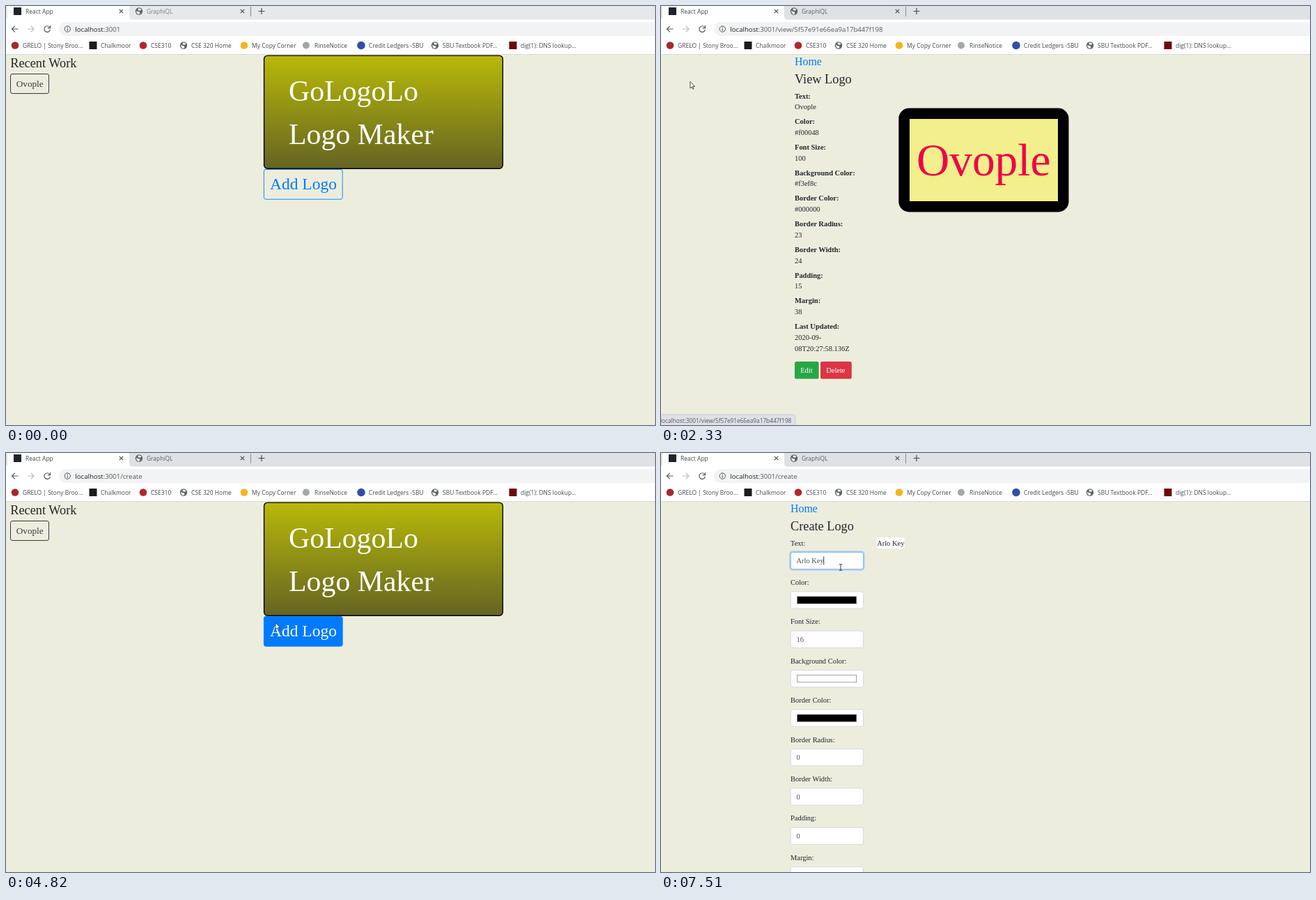
An HTML page for the animation above (8 s loop, 932x601 px).

```html
<!DOCTYPE html>
<html lang="en">
<head>
<meta charset="utf-8">
<title>Logo maker</title>
<style>
html, body { margin: 0; width: 100%; height: 100%; overflow: hidden; background: #ededde; }
svg { display: block; width: 932px; height: 601px; }
text { white-space: pre; }
.ui { font-family: "Open Sans", "Noto Sans", sans-serif; }
.page { font-family: "Liberation Serif", "Noto Serif", serif; }
</style>
</head>
<body>
<svg id="stage" viewBox="0 0 932 601"></svg>
<script>
const LOOP = 8000;
const BASE = 10.46;
const INK = '#212529';
const HASH = '/view/5f57e91e66ea9a17b447f198';
const LOGO = 'Ovople';
const NAME = 'Arlo Key';

const text = (x, y, size, str, fill = INK, extra = '') =>
  `<text x="${x}" y="${y}" font-size="${size}" fill="${fill}" ${extra}>${str}</text>`;
const rect = (x, y, w, h, fill, extra = '') =>
  `<rect x="${x}" y="${y}" width="${w}" height="${h}" fill="${fill}" ${extra}/>`;
const dot = (x, y, r, fill, extra = '') =>
  `<circle cx="${x}" cy="${y}" r="${r}" fill="${fill}" ${extra}/>`;
const line = (d, color = '#54575c', width = 1.2, extra = '') =>
  `<path d="${d}" fill="none" stroke="${color}" stroke-width="${width}" ${extra}/>`;
const group = (id, body, cls = '') => `<g id="${id}" class="${cls}">${body}</g>`;

const globe = (x, y) => dot(x, y, 5.2, '#5f6368') +
  `<path d="M${x - 4} ${y - 1}q2 2 3.5 1.5t2 2.5l-2 1.5q-3-1-3.5-5.5zM${x - 1} ${y - 4}q3-.6 4.5 2l-2.5 1.2-2.5-1z" fill="#fff"/>`;
const cross = (x, y) => line(`M${x - 2.7} ${y - 2.7}l5.4 5.4m0-5.4l-5.4 5.4`, '#45484d', 1.1);
const square = (x, y, fill) => rect(x - 5.5, y - 5.5, 11, 11, fill);

function browser() {
  const marks = [
    [24, 'GRELO | Stony Broo...', dot(13, 56.5, 5.3, '#a5282c')],
    [136, 'Chalkmoor', square(125, 56.5, '#1c1c1c')],
    [208, 'CSE310', dot(197, 56.5, 5.3, '#b3272d')],
    [266, 'CSE 320 Home', globe(255, 56.5)],
    [353, 'My Copy Corner', dot(342, 56.5, 5.3, '#f2b51d')],
    [443, 'RinseNotice', dot(431, 56.5, 5, '#a3a6aa')],
    [521, 'Credit Ledgers -SBU', dot(510, 56.5, 5.8, '#2f4fa8')],
    [627, 'SBU Textbook PDF...', globe(616, 56.5)],
    [739, 'dig(1): DNS lookup...', square(728, 56.5, '#6d0a10')]
  ];
  return rect(0, 0, 932, 20, '#dee1e6', 'id="strip"') +
    '<path d="M-3 20Q2 20 2 14V-2H177V14Q177 20 183 20Z" fill="#fff"/>' +
    rect(0, 19.5, 932, 50, '#fff') + rect(0, 69, 932, 1, '#d9dad4') +
    square(16.5, 7.5, '#20232a') + text(28, 10.7, 8.5, 'React App', '#45484d') + cross(165.5, 7.5) +
    globe(191, 7.5) + text(202, 10.7, 8.4, 'GraphiQL', '#5b5e63', 'id="tab"') + cross(339.5, 7.5) +
    line('M351.5 1V15', '#85888d', 1) + line('M362.5 7.5h9m-4.5-4.5v9', '#45484d') +
    line('M17.5 33H8.5m4.3-4.3L8.5 33l4.3 4.3') +
    line('M31 33h9m-4.3-4.3L40 33l-4.3 4.3', '#b9bbbe') +
    line('M62.6 30.4A4.3 4.3 0 1 0 63.4 34M63.5 28v3.6h-3.6') +
    rect(76, 23, 880, 20, '#f1f3f4', 'rx="10"') +
    dot(88.3, 33, 4.2, 'none', 'stroke="#54575c"') + line('M88.3 32.4v3M88.3 30.3v1.1') +
    text(99.3, 36.5, 9.64, 'localhost<tspan id="url" fill="#55595e"></tspan>', '#202124') +
    marks.map(([x, label, icon]) => icon + text(x, 59.6, 8.5, label, '#45484d')).join('');
}

function homePage() {
  return text(6.3, 87.7, 18.3, 'Recent Work') +
    rect(6.5, 97.5, 55, 28, '#343a40', 'rx="2.6" id="workFill"') +
    rect(6.5, 97.5, 55, 28, 'none', 'rx="2.6" stroke="#343a40"') +
    text(14.8, 116, 13.2, LOGO, '#343a40', 'id="workText"') +
    rect(370.6, 71.1, 342.8, 162.2, 'url(#olive)', 'rx="5" stroke="#000" stroke-width="1.4"') +
    text(406, 135.7, 41.85, 'GoLogoLo', '#fff') + text(406, 198.4, 41.85, 'Logo Maker', '#fff') +
    rect(370.4, 234.4, 112.8, 42.8, '#007bff', 'rx="2.6" id="addFill"') +
    rect(370.4, 234.4, 112.8, 42.8, 'none', 'rx="2.6" stroke="#007bff" stroke-width=".9"') +
    text(379, 263.4, 23.5, 'Add Logo', '#007bff', 'id="addText"');
}

function viewPage() {
  const rows = [['Text', LOGO], ['Color', '#f00048'], ['Font Size', 100], ['Background Color', '#f3ef8c'],
    ['Border Color', '#000000'], ['Border Radius', 23], ['Border Width', 24], ['Padding', 15],
    ['Margin', 38], ['Last Updated', '2020-09-']];
  return text(192, 85.3, 15.9, 'Home', '#007bff', 'id="homeLink"') + text(192, 111.3, 18.3, 'View Logo') +
    rows.map(([label, value], i) => {
      const y = 132.5 + i * 36.73;
      return text(192, y, BASE, label + ':', INK, 'font-weight="bold"') + text(192, y + 15.7, BASE, value);
    }).join('') +
    text(192, 494.6, BASE, '08T20:27:58.136Z') +
    rect(192, 510, 34.6, 24.8, '#28a745', 'rx="2.6"') + text(200.2, 525.5, BASE, 'Edit', '#fff') +
    rect(229, 510, 44.8, 24.8, '#dc3545', 'rx="2.6"') + text(237.2, 525.5, BASE, 'Delete', '#fff') +
    rect(341.3, 146.5, 244.2, 149, '#000', 'rx="15"') + rect(357, 162, 213, 118, '#f3ef8c') +
    text(367, 243.4, 65.4, LOGO, '#f00048');
}

function createPage() {
  const rows = [['Text', ''], ['Color', '#000'], ['Font Size', '16'], ['Background Color', '#fff'],
    ['Border Color', '#000'], ['Border Radius', '0'], ['Border Width', '0'], ['Padding', '0'], ['Margin', '0']];
  return text(186, 85.3, 15.9, 'Home', '#007bff') + text(186, 111.3, 18.3, 'Create Logo') +
    rows.map(([label, value], i) => {
      const y = 132.5 + i * 56.4;
      return text(186, y, BASE, label + ':') +
        rect(186.3, y + 9.9, 104.2, 24.2, '#fff', 'rx="2.6" stroke="#ced4da" stroke-width=".8"') +
        (value[0] === '#'
          ? rect(195.7, y + 17, 85, 10.2, value, 'stroke="#767676" stroke-width=".7"')
          : text(194.5, y + 25.6, BASE, value, '#495057'));
    }).join('') +
    group('focus', rect(185.3, 141.4, 106.2, 26.2, 'none', 'rx="3.5" stroke="#007bff" stroke-opacity=".25" stroke-width="2.2"') +
      rect(186.3, 142.4, 104.2, 24.2, 'none', 'rx="2.6" stroke="#80bdff"')) +
    text(194.5, 158.1, BASE, '', '#495057', 'id="field"') + rect(0, 148.5, .9, 12, '#222', 'id="caret"') +
    rect(310, 121, 0, 16, '#fff', 'id="plate"') + text(310.2, 132.5, BASE, '', INK, 'id="preview"');
}

const outline = 'fill="#fff" stroke="#222" stroke-width=".8" stroke-linejoin="round"';
const pointers =
  `<path id="arrow" d="M.4.4V10L2.6 8 4.2 11.3 5.5 10.7 4 7.4H7Z" ${outline}/>` +
  `<path id="hand" d="M-.2 8V1Q.8-.6 1.8 1V5Q3-.0 3.6 5.3 4.9 4 5.1 5.8 6.6 5 6.5 7V9.5Q6.4 11.5 5.4 13H.6Q-.6 11-2.6 8.4-2.6 6.3-.2 8Z" ${outline}/>` +
  line('M-2-4.4H-.6L0-4 .6-4.4H2M0-4V4M-2 4.4H-.6L0 4 .6 4.4H2', '#222', .9, 'id="beam"');

stage.innerHTML =
  '<defs><linearGradient id="olive" x2="0" y2="1"><stop stop-color="#b9b909"/><stop offset="1" stop-color="#646423"/></linearGradient></defs>' +
  rect(0, 0, 932, 601, '#ededde') +
  group('home', homePage(), 'page') + group('view', viewPage(), 'page') + group('create', createPage(), 'page') +
  group('chrome', browser(), 'ui') +
  group('status', '<path id="statusBox" fill="#dee1e6" stroke="#c3c7cc" stroke-width=".8"/>' +
    text(-1, 597.5, 8.28, '', '#55595e', 'id="statusText"'), 'ui') +
  group('pointer', pointers);

const el = id => document.getElementById(id);
const show = (id, on) => el(id).setAttribute('visibility', on ? 'visible' : 'hidden');
const attr = (id, name, value) => el(id).setAttribute(name, value);
const write = (id, str) => { if (el(id).textContent !== str) el(id).textContent = str; };
const ramp = (t, start, length) => Math.min(1, Math.max(0, (t - start) / length));
const blend = (a, b, k) => `rgb(${a.map((v, i) => Math.round(v + (b[i] - v) * k))})`;

// time, x, y of the pointer tip
const path = [[0, 870, 612], [280, 870, 612], [470, 689, 514], [700, 689, 514], [960, 422.5, 350.5],
  [1200, 422.5, 350.5], [1640, 66, 82], [1800, 41.5, 108], [2400, 41.5, 108], [2750, 137.5, 149.5],
  [2890, 137.5, 149.5], [3670, 208.7, 82], [4110, 208.7, 82], [4740, 386.7, 243], [4960, 386.7, 243],
  [5480, 258, 164], [LOOP, 258, 164]];
const keys = [6390, 6620, 6720, 6820, 6980, 7210, 7410, 7510];

function position(t) {
  const i = path.findIndex(p => p[0] > t);
  const a = path[i - 1], b = path[i];
  const u = ramp(t, a[0], b[0] - a[0]);
  const k = u * .5 + u * u * (3 - 2 * u) * .5;
  return [a[1] + (b[1] - a[1]) * k, a[2] + (b[2] - a[2]) * k];
}

function typed(t) {
  if (t < 5930) return 'Logo Name';
  if (t < 6030) return 'Logo ';
  return NAME.slice(0, keys.filter(k => k <= t).length);
}

function draw(t) {
  const page = t < 2120 ? 'home' : t < 3870 ? 'view' : t < 4850 ? 'home' : 'create';
  for (const id of ['home', 'view', 'create']) el(id).style.display = id === page ? '' : 'none';
  write('url', ':3001' + (t < 2050 ? '' : t < 3840 ? HASH : t < 4800 ? '' : '/create'));
  attr('strip', 'fill', t < 2050 ? '#e7e8ec' : '#dee1e6');
  attr('tab', 'fill', t < 2050 ? '#7c7f84' : '#5b5e63');

  const [x, y] = position(t);
  const work = t < 2200 ? ramp(t, 1735, 150) : 0;
  attr('workFill', 'fill-opacity', work);
  attr('workText', 'fill', blend([52, 58, 64], [255, 255, 255], work));
  const add = ramp(t, 4640, 150);
  attr('addFill', 'fill-opacity', add);
  attr('addText', 'fill', blend([0, 123, 255], [255, 255, 255], add));
  const onHome = page === 'view' && x > 192 && x < 231 && y > 73 && y < 89;
  attr('homeLink', 'fill', onHome ? '#0056b3' : '#007bff');
  attr('homeLink', 'text-decoration', onHome ? 'underline' : 'none');

  const first = t < 3000;
  attr('statusBox', 'd', `M-2 586H${first ? 190 : 57}q3 0 3 3V603H-2Z`);
  write('statusText', 'localhost:3001' + (first ? HASH : ''));
  attr('status', 'opacity', first ? ramp(t, 1900, 80) - ramp(t, 2560, 150) : ramp(t, 3770, 60) - ramp(t, 4120, 120));

  if (page === 'create') {
    const str = typed(t), focused = ramp(t, 5490, 150);
    write('field', str);
    write('preview', str.trim());
    attr('plate', 'width', str ? el('preview').getComputedTextLength() + .3 : 0);
    attr('caret', 'x', 194.1 + (str ? el('field').getComputedTextLength() : 0));
    attr('caret', 'opacity', focused > 0 ? 1 : 0);
    attr('focus', 'opacity', focused);
  }

  const beam = page === 'create' && x < 291 && y < 180;
  const hand = onHome || work > 0 || (page === 'home' && add > 0 && t < 4790);
  show('beam', beam);
  show('hand', hand);
  show('arrow', !beam && !hand);
  attr('pointer', 'transform', `translate(${x} ${y})`);
}

const start = performance.now();
function tick() {
  draw((performance.now() - start) % LOOP);
  requestAnimationFrame(tick);
}
tick();
</script>
</body>
</html>
```
